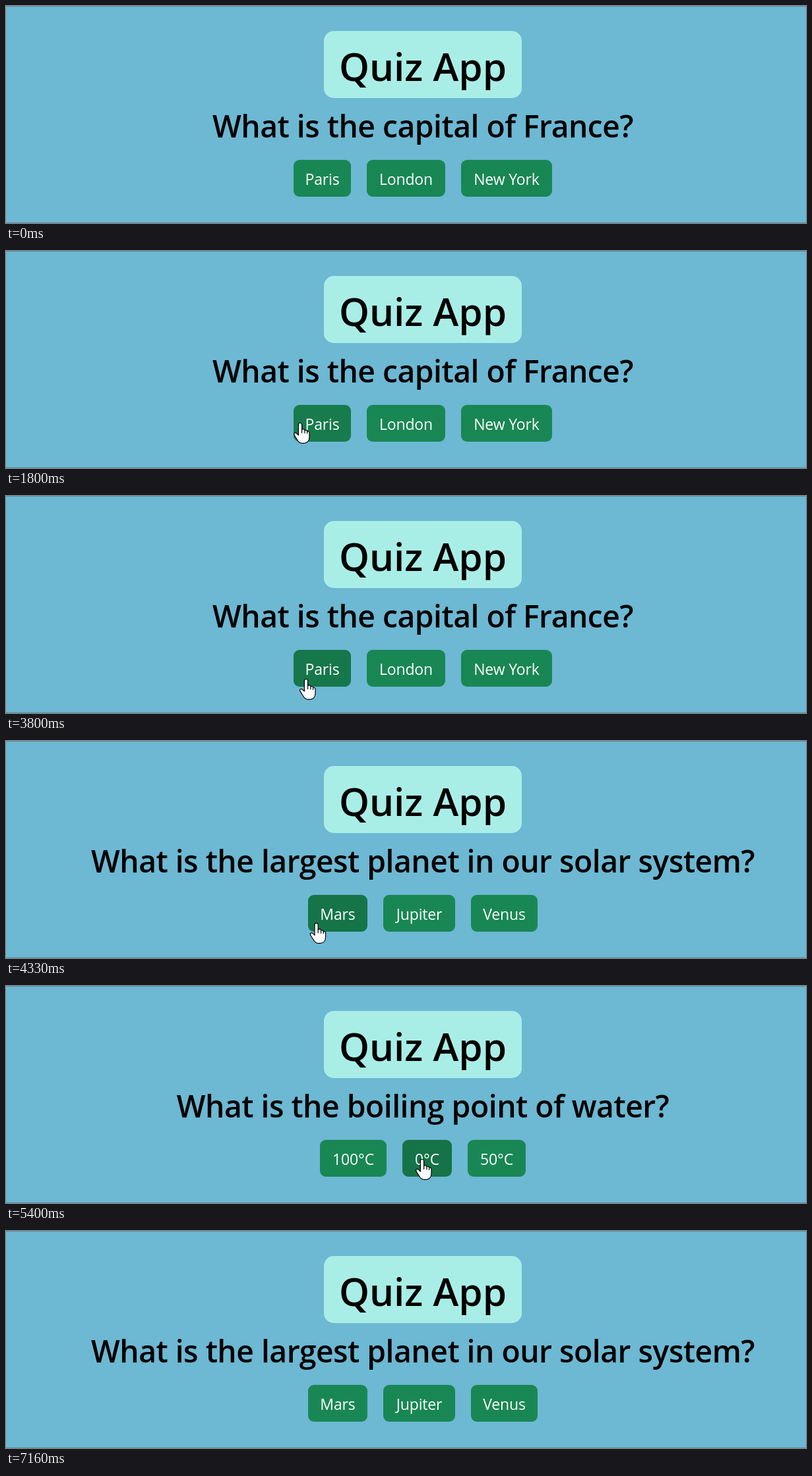
An HTML page for the animation above (7.57 s loop, 1213 by 330 pixels).

```html
<!DOCTYPE html>
<html lang="en">
<head>
<meta charset="utf-8">
<title>Quiz</title>
<style>
  html, body { margin: 0; width: 100%; height: 100%; overflow: hidden; background: #6db8d3; }
  svg { display: block; width: 1213px; height: 330px; }
  text { font-family: "Open Sans", "Noto Sans", sans-serif; text-anchor: middle; }
  .title { font-size: 58.5px; font-weight: 600; }
  .question { font-size: 46.3px; font-weight: 600; letter-spacing: -.011em; }
  .label { font-size: 23px; fill: #fff; letter-spacing: -.006em; }
  .cursor path { fill: #fff; stroke: #000; stroke-width: 1.2; stroke-linejoin: round; }
  .cursor .line { fill: none; stroke-linecap: round; }
</style>
</head>
<body>
<svg viewBox="0 0 1213 330">
  <rect width="1213" height="330" fill="#6db8d3"/>
  <path d="M0 .5H1213M0 329.5H1213" stroke="#548fa6"/>
  <rect id="badge" x="482" y="38" width="300" height="102" rx="15"/>
  <text id="title" class="title" x="632" y="114">Quiz App</text>
  <text id="question" class="question" x="632" y="200"></text>
  <g id="buttons"></g>
  <circle id="click" r="18" fill="#ff0" opacity=".5"/>
  <g id="cursor" class="cursor">
    <g id="arrow">
      <path d="M.5.5V24L6 18.8 10 27.6 14 25.9 10.1 17.2H17.4Z"/>
    </g>
    <g id="beam">
      <path class="line" d="M-5-12H-1.5L0-11 1.5-12H5M0-11V11M-5 12H-1.5L0 11 1.5 12H5"/>
    </g>
    <g id="hand" transform="translate(-1 -.5)">
      <path d="M-2.6 2.4C-2.6-.8 2.6-.8 2.6 2.4V10.5C4 9 4 9 4.3 9.4 6 9 7 10 7 11.4 9 10.4 10.6 11.4 10.6 13 12.6 12.2 14 13.4 14 15.2V21C14 27 11 30.8 6 30.8H3C-.5 30.8-2.5 29-4.2 26L-9 18.4C-10.4 15.6-7.4 13.6-5.4 15.8L-2.6 18.6Z"/>
      <path class="line" d="M2.6 10V15M7 11.4V15.5M10.6 13V16"/>
    </g>
  </g>
</svg>
<script>
const LOOP = 7570, STEP = 1000 / 15, CENTER = 632, GAP = 24;
const $ = id => document.getElementById(id);

const quiz = {
  capital: { text: "What is the capital of France?", answers: [["Paris", 87], ["London", 119], ["New York", 138]] },
  planet: { text: "What is the largest planet in our solar system?", answers: [["Mars", 90], ["Jupiter", 109], ["Venus", 101]] },
  water: { text: "What is the boiling point of water?", answers: [["100°C", 101], ["0°C", 75], ["50°C", 88]] }
};
for (const item of Object.values(quiz)) {
  const total = item.answers.reduce((sum, [, width]) => sum + width, 2 * GAP);
  let x = CENTER - total / 2;
  item.boxes = item.answers.map(([label, width]) => {
    const box = { label, x, width };
    x += width + GAP;
    return box;
  });
}

// Each stop: time, x, y of the pointer's hot spot.
const route = [
  [200, 880, 290], [470, 730, 200], [735, 600, 105], [935, 600, 105],
  [1130, 485, 106], [1270, 420, 122], [1400, 394, 165], [1600, 408, 228],
  [1730, 438, 255], [1800, 447, 262], [1930, 447, 264], [2430, 447, 264],
  [2800, 610, 270], [3240, 765, 271], [3270, 765, 271], [3530, 625, 268],
  [3800, 456, 279], [4270, 456, 279], [4530, 520, 272], [4800, 632, 264],
  [5540, 632, 264], [5870, 767, 269], [6600, 767, 269], [7130, 1075, 330]
];
const clicks = [1930, 4130, 5190, 6350];
const CLICK_TIME = 135;

const questionAt = t =>
  t < 4265 ? quiz.capital : t < 5260 ? quiz.planet : t < 6480 ? quiz.water : quiz.planet;

function pointerAt(t) {
  if (t < route[0][0] || t >= 7095) return null;
  const i = route.findIndex(stop => stop[0] > t);
  const [t0, x0, y0] = route[i - 1], [t1, x1, y1] = route[i];
  const k = (t - t0) / (t1 - t0);
  return { x: x0 + (x1 - x0) * k, y: y0 + (y1 - y0) * k };
}

const inside = (p, x, y, w, h) => p && p.x >= x && p.x < x + w && p.y >= y && p.y < y + h;
const overButton = (p, box) => inside(p, box.x, 234, box.width, 56);

// Linear 150 ms fade, taken as the share of recent time spent hovering.
function hoverAmount(index, t) {
  const samples = 10;
  let hits = 0;
  for (let i = 0; i < samples; i++) {
    const past = t - i * 150 / samples;
    if (overButton(pointerAt(past), questionAt(past).boxes[index])) hits++;
  }
  return hits / samples;
}

const base = [25, 135, 84], hovered = [21, 115, 71];
const mix = k => `rgb(${base.map((c, i) => Math.round(c + (hovered[i] - c) * k))})`;

function setAll(node, attributes) {
  for (const name in attributes) node.setAttribute(name, attributes[name]);
}
function addShape(tag, attributes) {
  const node = document.createElementNS("http://www.w3.org/2000/svg", tag);
  setAll(node, attributes);
  return $("buttons").appendChild(node);
}
const show = (id, on) => $(id).setAttribute("visibility", on ? "visible" : "hidden");

const buttons = [0, 1, 2].map(() => ({
  rect: addShape("rect", { y: 234, height: 56, rx: 9 }),
  label: addShape("text", { y: 272, class: "label" })
}));

function render(time) {
  const t = Math.floor((time % LOOP + 4) / STEP) * STEP;
  const item = questionAt(t), p = pointerAt(t);

  $("question").textContent = item.text;
  buttons.forEach(({ rect, label }, i) => {
    const box = item.boxes[i];
    setAll(rect, { x: box.x, width: box.width, fill: mix(hoverAmount(i, t)) });
    label.setAttribute("x", box.x + box.width / 2);
    label.textContent = box.label;
  });

  const onBadge = inside(p, 482, 38, 300, 102);
  $("badge").setAttribute("fill", onBadge ? "#85beb8" : "#a9eee6");
  $("title").setAttribute("fill", onBadge ? "#fff" : "#000");

  const onHand = item.boxes.some(box => overButton(p, box));
  const onText = inside(p, 507, 62, 250, 60) || inside(p, 313, 160, 638, 52);
  show("hand", p && onHand);
  show("beam", p && onText);
  show("arrow", p && !onHand && !onText);
  show("click", p && clicks.some(c => t >= c - 5 && t < c + CLICK_TIME - 5));
  if (p) {
    const place = `translate(${p.x.toFixed(1)} ${p.y.toFixed(1)})`;
    $("cursor").setAttribute("transform", place);
    $("click").setAttribute("transform", place);
  }
}

const start = performance.now();
function tick() {
  render(performance.now() - start);
  requestAnimationFrame(tick);
}
tick();
</script>
</body>
</html>
```
